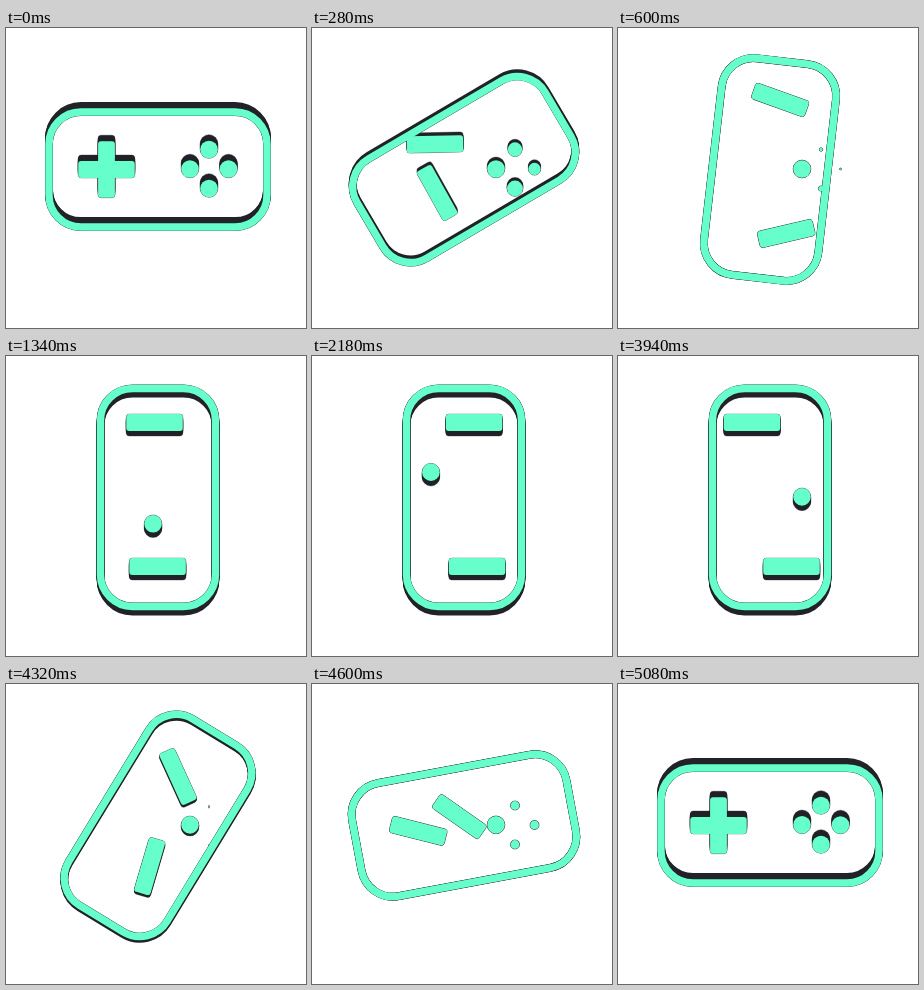
An HTML page with a canvas that plays this animation: 300 px wide and 300 px high, repeating every 6 s.

```html
<!DOCTYPE html>
<html lang="en">
<head>
<meta charset="utf-8">
<title>Gamepad to paddle game</title>
<style>
  html, body { margin: 0; width: 100%; height: 100%; overflow: hidden; background: #fff; }
  canvas { display: block; width: 300px; height: 300px; }
</style>
</head>
<body>
<canvas id="stage" width="300" height="300"></canvas>
<script>
const ctx = document.getElementById('stage').getContext('2d');
const LOOP = 6000, TURN = 720, MINT = '#66ffcc', DARK = '#222229';
const CX = 152, CY = 141.5, PAD_X = 100.5, BALL_R = 8.8;
const SERVE = 781, RETURN = 3940;

const smooth = u => u * u * (3 - 2 * u);
const linear = u => u;
const clamp = (v, lo, hi) => Math.min(hi, Math.max(lo, v));

// Value of a keyed track [[time, value], ...] at time t
function track(keys, t, ease = smooth) {
  const i = keys.findIndex(k => t < k[0]);
  if (i === 0) return keys[0][1];
  if (i < 0) return keys[keys.length - 1][1];
  const [t0, a] = keys[i - 1], [t1, b] = keys[i];
  return a + (b - a) * ease((t - t0) / (t1 - t0));
}

// Rest value, moved to "away" for the game, then back
const trip = (rest, away, back, start = 0) =>
  [[start, rest], [start + TURN, away], [back, away], [back + TURN, rest]];

// Paddle positions at even steps through the rally
const rally = (...xs) =>
  xs.map((x, i) => [TURN + (RETURN - TURN) * i / (xs.length - 1), x]);

const frameTurn = trip(0, -90, 4035);
const depth = [[0, -6], [600, 0], [1080, 5], [4000, 5], [4600, 0], [5080, -6]];

const paddles = [
  {
    x: [[0, PAD_X], ...rally(167, 150, 128, 170, 152, 165, 134), [4360, 173], [4960, PAD_X]],
    y: trip(CY, 66.5, 4035),
    turn: trip(270, 0, 4090)
  },
  {
    x: [[0, PAD_X], ...rally(173.5, 150, 174, 163, 140, 158, 173.5), [4005, 173.5], [4725, PAD_X]],
    y: trip(CY, 210.5, 4005),
    turn: trip(0, 180, 4005)
  }
];

// Right, top and bottom buttons vanish one after another
const buttons = [0, -1, 1].map((quarter, i) => ({
  x: 203 + 19.5 * Math.cos(quarter * Math.PI / 2),
  y: CY - 0.5 + 19.5 * Math.sin(quarter * Math.PI / 2),
  r: trip(BALL_R, 0, 4240, 20 + 60 * i)
}));

// The ball bounces between the side walls and the two paddles
const ballX = [[SERVE, 184], [1948, 107], [3690, 196], [RETURN, 184]];
function ballY(t) {
  const pass = Math.abs(clamp(t, SERVE, RETURN) - 1948) / 790 % 2;
  return 84 + 109 * (1 - Math.abs(1 - pass));
}

function box(x, y, turn, w, h, r) {
  const p = new Path2D(), local = new Path2D();
  local.roundRect(-w / 2, -h / 2, w, h, r);
  p.addPath(local, new DOMMatrix().translate(x, y).rotate(turn));
  return p;
}

function disc(x, y, r) {
  const p = new Path2D();
  p.arc(x, y, r, 0, Math.PI * 2);
  return p;
}

function paint(ring, solids, color, edge) {
  ctx.strokeStyle = ctx.fillStyle = color;
  ctx.lineWidth = 7.4 + edge;
  ctx.stroke(ring);
  ctx.lineWidth = edge;
  for (const s of solids) {
    ctx.fill(s);
    if (edge) ctx.stroke(s);
  }
}

function draw(t) {
  const ring = box(CX, CY, track(frameTurn, t), 218, 115, 32);
  const solids = paddles.map(p =>
    box(track(p.x, t), track(p.y, t), track(p.turn, t), 56.5, 16.8, 3));
  solids.push(disc(track(ballX, t, linear), ballY(t), BALL_R));
  for (const b of buttons) {
    const r = track(b.r, t);
    if (r > 0.05) solids.push(disc(b.x, b.y, r));
  }

  ctx.fillStyle = '#fff';
  ctx.fillRect(0, 0, 300, 300);

  // Extruded side, then the face
  const d = track(depth, t, linear);
  const steps = Math.max(1, Math.ceil(Math.abs(d)));
  for (let i = steps; i >= 0; i--) {
    ctx.save();
    ctx.translate(0, d * i / steps);
    paint(ring, solids, DARK, 0.4);
    ctx.restore();
  }
  paint(ring, solids, MINT, 0);
}

const begin = performance.now();
function tick() {
  draw((performance.now() - begin) % LOOP);
  requestAnimationFrame(tick);
}
tick();
</script>
</body>
</html>
```
